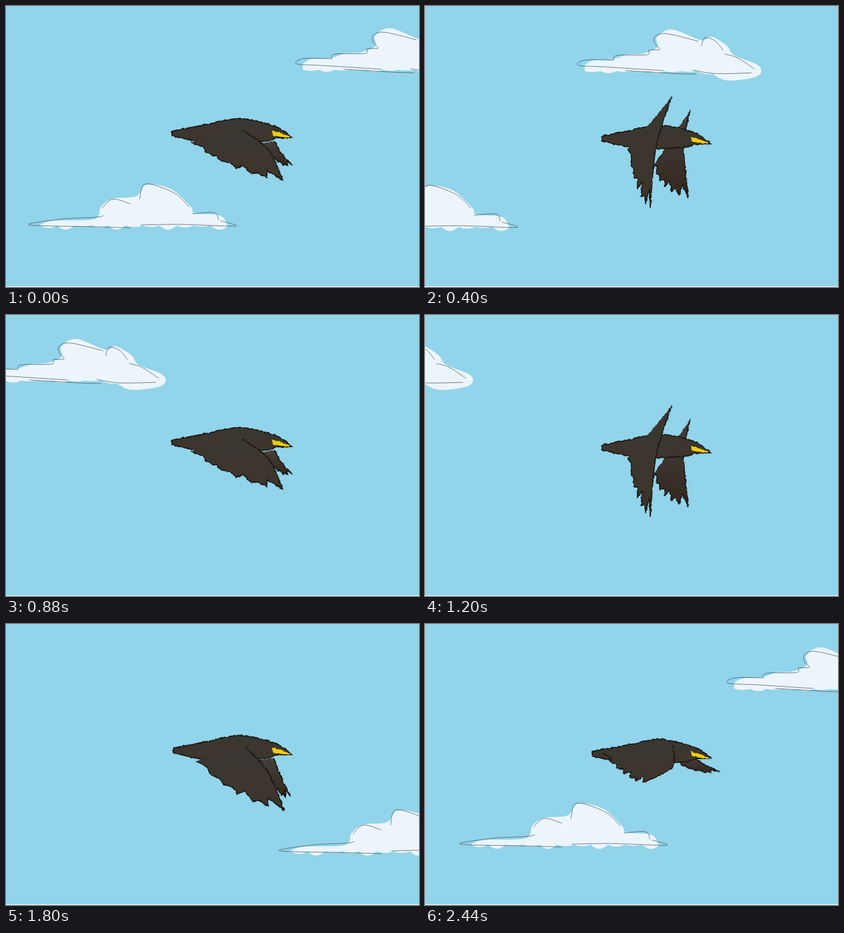
Write an HTML page that moves like this. It is 704x480 px and loops after 2.52 s.

```html
<!DOCTYPE html>
<html lang="en">
<head>
<meta charset="utf-8">
<title>Bird in flight</title>
<style>
html, body { margin: 0; width: 100%; height: 100%; overflow: hidden; background: #fff; }
svg { display: block; width: 100vw; height: 100vh; }
.white { fill: #ebf5fb; }
.pencil { fill: none; stroke: #3b4449; stroke-width: .9; stroke-linecap: round; opacity: .8; }
.bird { stroke: #191511; stroke-width: 1.8; stroke-linejoin: round; stroke-linecap: round; }
.far { fill: url(#farFill); }
.near { fill: url(#nearFill); }
.gold { fill: #f1cd08; stroke: none; }
.feet { fill: #f1cd08; stroke-width: 1; }
</style>
</head>
<body>
<svg viewBox="0 0 704 480" preserveAspectRatio="none">
  <defs>
    <linearGradient id="nearFill" x1="0" y1="0" x2="0" y2="1">
      <stop offset="0" stop-color="#3a3732"/><stop offset="1" stop-color="#3d352b"/>
    </linearGradient>
    <linearGradient id="farFill" x1="0" y1="0" x2="0" y2="1">
      <stop offset="0" stop-color="#433f39"/><stop offset="1" stop-color="#33281f"/>
    </linearGradient>
    <filter id="rough" filterUnits="userSpaceOnUse" x="0" y="0" width="704" height="480" color-interpolation-filters="sRGB">
      <feTurbulence type="fractalNoise" baseFrequency=".16" numOctaves="2" seed="4" result="noise"/>
      <feDisplacementMap in="SourceGraphic" in2="noise" scale="4" xChannelSelector="R" yChannelSelector="G"/>
    </filter>
  </defs>
  <rect width="704" height="479" fill="#92d4ea"/>
  <g id="clouds"></g>
  <g id="bird" class="bird" filter="url(#rough)"></g>
</svg>
<script>
const LOOP = 2520, TICK = 40, POSE = 84, BEATS = 10, FEATHERS = 6;
const $ = id => document.getElementById(id);
const lerp = (a, b, k) => a + (b - a) * k;
const mix = (p, q, k) => p.map((v, i) => lerp(v, q[i], k));
const add = ([x, y], dx, dy) => [x + dx, y + dy];
const pairs = a => a.flatMap((v, i) => i % 2 ? [] : [[v, a[i + 1]]]);
const path = (name, d) => `<path class="${name}" d="${d}"/>`;

// Smooth curve through all points
function curve(p, start = "M") {
  let d = start + p[0];
  for (let i = 1; i < p.length; i++) {
    const a = p[i - 1], b = p[i], before = p[i - 2] || a, after = p[i + 1] || b;
    const c1 = a.map((v, j) => v + (b[j] - before[j]) / 6);
    const c2 = b.map((v, j) => v - (after[j] - a[j]) / 6);
    d += `C${c1} ${c2} ${b}`;
  }
  return d;
}

// Value of a track [position, ...numbers] between its two nearest keys
function sample(track, t) {
  const i = Math.max(1, track.findIndex(k => k[0] > t));
  const [a, b] = [track[i - 1], track[i]];
  return mix(a, b, (t - a[0]) / (b[0] - a[0])).slice(1);
}
const cyclic = track => [...track, [BEATS, ...track[0].slice(1)]];

// Wing keys: beat, then shoulder, wrist, tip, middle of trailing edge, root
const nearWing = cyclic([
  [0, 403, 212, 447, 245, 472, 298, 392, 277, 316, 233],
  [2, 414, 210, 446, 260, 476, 339, 398, 303, 333, 235],
  [4, 420, 156, 394, 240, 384, 343, 362, 312, 346, 245],
  [5, 424, 215, 418, 165, 335, 135, 310, 185, 340, 222],
  [6, 425, 214, 398, 154, 293, 82, 297, 150, 342, 213],
  [8, 430, 208, 406, 177, 290, 161, 316, 193, 362, 209],
  [9, 422, 207, 421, 245, 372, 271, 338, 255, 304, 222]
]);
const farWing = cyclic([
  [0, 458, 231, 468, 250, 488, 272, 464, 267, 436, 234],
  [2, 455, 228, 465, 262, 481, 316, 457, 302, 428, 228],
  [4, 452, 178, 441, 240, 449, 328, 409, 309, 390, 272],
  [5, 445, 217, 449, 170, 412, 128, 408, 150, 422, 185],
  [6, 443, 219, 456, 180, 417, 88, 385, 132, 420, 192],
  [8, 437, 210, 468, 184, 362, 134, 354, 162, 408, 180],
  [9, 458, 229, 478, 241, 502, 252, 462, 251, 424, 231]
]);

// Smooth leading edge, feathered trailing edge
function wing(track, beat) {
  const [shoulder, wrist, tip, mid, root] = pairs(sample(track, beat));
  const hub = mix(mix(shoulder, root, .5), wrist, .4);
  const ctrl = mix(mix(tip, root, .5), mid, 2);
  const trail = u => mix(mix(tip, ctrl, u), mix(ctrl, root, u), u);
  let d = curve([shoulder, wrist, tip]);
  for (let i = 1; i <= FEATHERS; i++) {
    const depth = (.2 + .08 * Math.sin(i * 2.4)) * (1 - i / FEATHERS * .6);
    d += `L${mix(trail((i - .55) / FEATHERS), hub, depth)}L${trail(i / FEATHERS)}`;
  }
  return { d, raised: tip[1] < shoulder[1] };
}

function bird(beat) {
  const turn = 2 * Math.PI / BEATS;
  const lift = Math.cos((beat - 6) * turn);
  const near = wing(nearWing, beat), far = wing(farWing, beat);
  const beak = [488, 232.5 + 9.5 * lift];
  const tail = [293 - 10 * Math.cos(beat * turn), 224 + 8 * lift];
  const back = [398, 200 + 10 * lift];
  const belly = add(tail, 66, 17);
  const width = near.raised ? 8 : 4;
  const top = curve([add(tail, 0, -width), add(mix(tail, back, .5), 0, -2), back, add(beak, -44, -24), add(beak, -22, -16), beak]);
  const under = curve([beak, add(beak, -28, 1), add(beak, -46, 6), belly, add(tail, 0, width)], "L");
  const parts = [path("far", far.d), path("near", top + under + "Z"), path("near", near.d)];
  parts.push(path("gold", `M${add(beak, -35, -12)}l11 3 19 7 0 2 -13 -1 -15 -3z`));
  if (near.raised) parts.push(path("feet", `M${add(belly, -15, 0)}l18 -1 -3 6 -5 0 -1 -3 -3 3z`));
  return parts.join("");
}

// Cloud: smooth top, scalloped base running back to the first point
function cloud(points, base, bump) {
  const top = pairs(points), left = top[0][0], right = top.at(-1)[0];
  let d = curve(top);
  const n = Math.round((right - left) / 28);
  for (let i = 1; i <= n; i++) {
    const x = lerp(right, left, i / n), half = (right - left) / n / 2;
    d += `Q${x + half} ${base + bump * (1.4 + Math.sin(i * 2))} ${x} ${base}`;
  }
  return path("white", d + "Z");
}
const strokes = lines => lines.map(p => path("pencil", curve(pairs(p)))).join("");

$("clouds").innerHTML =
  cloud([506, 99, 520, 91, 553, 89, 578, 81, 606, 79, 630, 68, 629, 51, 655, 38, 704, 56, 722, 50, 749, 66,
    761, 82, 803, 100, 800, 118, 750, 125, 724, 114], 109, 3) +
  cloud([58, 374, 80, 367, 150, 364, 162, 343, 182, 329, 222, 325, 240, 305, 282, 313, 315, 343, 322, 354,
    365, 358, 378, 376], 375, 6) +
  strokes([
    [555, 90, 507, 90, 496, 99, 546, 102, 640, 108],
    [555, 90, 562, 82, 612, 81, 616, 73, 634, 72, 626, 62, 626, 50, 646, 45, 700, 58],
    [705, 66, 711, 52, 728, 57, 742, 73], [745, 80, 766, 86, 795, 105],
    [576, 108, 660, 113, 696, 114], [690, 107, 728, 113, 790, 112],
    [166, 358, 152, 361, 95, 364, 39, 374, 150, 377, 213, 379],
    [230, 374, 300, 373, 390, 376, 366, 367], [318, 355, 355, 353, 362, 365],
    [164, 345, 182, 330, 212, 338], [228, 330, 238, 304, 286, 319, 312, 343]
  ]);

// Cloud drift: time, x, y; the next round enters from the right at 1360
const drift = [
  [0, 0, 0], [40, 0, 0], [200, -95, 1.5], [560, -345, 3], [880, -535, 3], [1359, -820, 3],
  [1360, 686, 14], [1520, 590, 14], [2040, 288, 13], [2440, 21, 2], [LOOP, 0, 0]
];

let lastTick = -1;
function draw(ms) {
  const t = Math.floor(ms % LOOP / TICK) * TICK;
  if (t === lastTick) return;
  lastTick = t;
  $("clouds").setAttribute("transform", `translate(${sample(drift, t)})`);
  $("bird").innerHTML = bird(Math.floor(t / POSE) % BEATS);
}

const start = performance.now();
function loop() {
  draw(performance.now() - start);
  requestAnimationFrame(loop);
}
loop();
</script>
</body>
</html>
```
